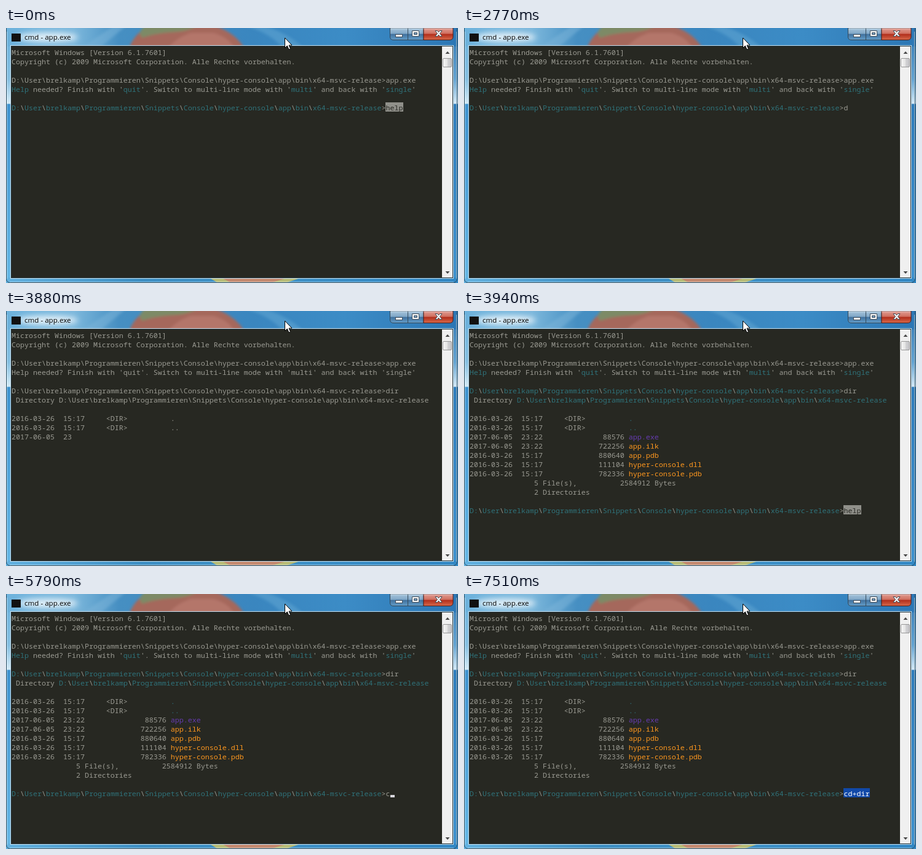
An HTML page for the animation above (8 s loop, 735 px wide and 415 px high).

```html
<!DOCTYPE html>
<html lang="en">
<head>
<meta charset="utf-8">
<title>Console</title>
<style>
  html, body { margin: 0; width: 100%; height: 100%; overflow: hidden; background: #3a88c0; }
  #stage { position: relative; width: 735px; height: 415px; overflow: hidden; }
  #stage > * { position: absolute; }
  #window { left: 0; top: 0; display: block; }
  #title { left: 30px; top: 7px; font: 11.6px/16px "Open Sans", "Noto Sans", sans-serif; color: #000; white-space: pre; }
  pre {
    left: 9px; top: 32px; margin: 0; color: #9a9a92;
    font: 11.667px/15px "Noto Sans Mono", "Liberation Mono", monospace;
    font-variant-ligatures: none;
  }
  pre b, pre i, pre u { font-weight: inherit; font-style: normal; text-decoration: none; }
  pre b { color: #2f727a; }
  pre i { color: #fd971f; }
  pre u { color: #663bb0; }
  pre.plain * { color: inherit; }
  .hint { color: #272822; }
  .pick { color: #fff; }
  #mark { left: 617px; height: 15px; }
  #caret { width: 7px; height: 4px; background: #d8d7dd; }
</style>
</head>
<body>
<div id="stage">
  <svg id="window" width="735" height="415" viewBox="0 0 735 415">
    <defs>
      <linearGradient id="sky" x2="1" y2="0">
        <stop offset="0" stop-color="#6db2dc"/><stop offset=".15" stop-color="#7db8dc"/>
        <stop offset=".25" stop-color="#468fc2"/><stop offset=".55" stop-color="#3a86bf"/>
        <stop offset=".75" stop-color="#3c8cc6"/><stop offset="1" stop-color="#2c76b4"/>
      </linearGradient>
      <linearGradient id="left" x2="0" y2="1">
        <stop offset="0" stop-color="#69b0dc"/><stop offset=".2" stop-color="#86c0e2"/>
        <stop offset=".295" stop-color="#d4eaf6"/><stop offset=".3" stop-color="#3f93d0"/>
        <stop offset="1" stop-color="#66b8e6"/>
      </linearGradient>
      <linearGradient id="right" x2="0" y2="1">
        <stop offset="0" stop-color="#2c72ae"/><stop offset=".2" stop-color="#5f9fce"/>
        <stop offset=".295" stop-color="#d0e6f4"/><stop offset=".3" stop-color="#2a78b8"/>
        <stop offset="1" stop-color="#3a8ecb"/>
      </linearGradient>
      <linearGradient id="floor" x2="1" y2="0">
        <stop offset="0" stop-color="#63b2e0"/><stop offset=".3" stop-color="#3d8fc4"/>
        <stop offset=".6" stop-color="#3f92c8"/><stop offset="1" stop-color="#3187c4"/>
      </linearGradient>
      <linearGradient id="glass" x2="0" y2="1">
        <stop offset="0" stop-color="#a9c6dc"/><stop offset=".48" stop-color="#7fa6c6"/>
        <stop offset=".5" stop-color="#3f6f9c"/><stop offset="1" stop-color="#649dc8"/>
      </linearGradient>
      <linearGradient id="red" x2="0" y2="1">
        <stop offset="0" stop-color="#e2a197"/><stop offset=".48" stop-color="#cf6c5c"/>
        <stop offset=".5" stop-color="#b02c1a"/><stop offset="1" stop-color="#d7694a"/>
      </linearGradient>
      <linearGradient id="grip" x2="1" y2="0">
        <stop offset="0" stop-color="#f6f6f6"/><stop offset=".5" stop-color="#e4e4e4"/>
        <stop offset=".55" stop-color="#d2d2d4"/><stop offset="1" stop-color="#c4c4c8"/>
      </linearGradient>
      <filter id="soft" x="-30%" y="-80%" width="160%" height="260%"><feGaussianBlur stdDeviation="5"/></filter>
      <filter id="blur"><feGaussianBlur stdDeviation="2"/></filter>
      <clipPath id="bar"><path d="M0 0H735V30H0Z"/></clipPath>
      <clipPath id="base"><path d="M0 406H735V415H0Z"/></clipPath>
    </defs>

    <rect width="367" height="415" fill="url(#left)"/>
    <rect x="367" width="368" height="415" fill="url(#right)"/>
    <rect width="735" height="30" fill="url(#sky)"/>
    <g clip-path="url(#bar)">
      <g filter="url(#blur)">
        <path d="M200 34Q206 12 232 -4H340Q376 10 388 34Z" fill="#a5675c"/>
        <path d="M226 -4H312Q296 6 268 7Q240 9 222 16Q212 8 226 -4Z" fill="#7d8a66"/>
        <path d="M262 34Q276 16 300 8H338Q364 16 372 34Z" fill="#b4766a"/>
        <path d="M388 -4Q430 8 452 34H486Q456 6 416 -4Z" fill="#63a8d4" opacity=".5"/>
        <path d="M120 34L176 -4H196L150 34Z" fill="#7fb6da" opacity=".5"/>
      </g>
    </g>
    <rect y="406" width="735" height="9" fill="url(#floor)"/>
    <g clip-path="url(#base)">
      <path d="M328 405H484Q464 412 444 418H350Z" fill="#b9bd78"/>
      <path d="M348 405H462Q440 412 420 418H372Z" fill="#c58a70"/>
    </g>

    <ellipse cx="67" cy="15" rx="50" ry="8" fill="#fff" opacity=".75" filter="url(#soft)"/>
    <rect x=".5" y="-4.5" width="733" height="419" rx="6" fill="none" stroke="#2c4a5c"/>
    <path d="M1.5 6V408M732.5 6V408M6 413.5H728" stroke="#d8eef8" opacity=".6"/>

    <rect x="9" y="9" width="15" height="13" fill="#111"/>

    <path d="M624.5 0V14Q624.5 19.500 630 19.500H679V0Z" fill="url(#glass)" stroke="#34495a"/>
    <path d="M679 0H727V14Q727 19.500 721 19.500H679Z" fill="url(#red)" stroke="#4a1f1c"/>
    <path d="M653.500 0V19" stroke="#34495a"/>
    <path d="M625.500 1H726" stroke="#fff" opacity=".5"/>
    <g fill="#fff" stroke="#414c58" stroke-width="1">
      <rect x="633.500" y="10.500" width="11" height="4"/>
      <path fill-rule="evenodd" d="M660.500 4.500H671.500V13.500H660.500ZM663.500 7.500V10.500H668.500V7.500Z"/>
      <path d="M698 4.500H701.500L703.500 7L705.500 4.500H709L705.500 9L709 13.500H705.500L703.500 11L701.500 13.500H698L701.500 9Z"/>
    </g>

    <rect x="7.500" y="28.500" width="720" height="379" fill="none" stroke="#d6edf8" opacity=".9"/>
    <rect x="8" y="29" width="719" height="378" fill="#1b2b33"/>
    <rect x="9" y="30" width="700" height="376" fill="#272822"/>
    <rect x="709" y="30" width="17" height="376" fill="#f0f0f0"/>
    <rect x="710.500" y="49.500" width="14" height="14" rx="1.500" fill="url(#grip)" stroke="#979797"/>
    <path d="M714.500 42L718 38L721.500 42ZM714.500 396L718 400L721.500 396Z" fill="#484848"/>
  </svg>
  <div id="title">cmd - app.exe</div>
  <div id="mark"></div>
  <div id="caret"></div>
  <pre id="text"></pre>
  <svg style="left:453px;top:15px" width="14" height="22">
    <path d="M.5 1V17.500L4.300 13.900L7 20L9.600 18.900L7 13H12Z" fill="#fff" stroke="#000"/>
  </svg>
</div>
<script>
const $ = id => document.getElementById(id);
const link = s => `<b>${s}</b>`;
const dir = 'D:\\User\\brelkamp\\Programmieren\\Snippets\\Console\\hyper-console\\app\\bin\\x64-msvc-release';
const linkedDir = dir.split('\\').map(link).join('\\');
const prompt = linkedDir + '&gt;';

const file = (date, time, size, name) => `${date}  ${time}${size.padStart(19)} ${name}`;
const folder = name => '2016-03-26  15:17     &lt;DIR&gt;' + ' '.repeat(10) + link(name);

const intro = [
  'Microsoft Windows [Version 6.1.7601]',
  'Copyright (c) 2009 Microsoft Corporation. Alle Rechte vorbehalten.',
  '',
  dir + '&gt;app.exe',
  `${link('Help')} needed? Finish with '${link('quit')}'. Switch to multi-line mode with '${link('multi')}' and back with '${link('single')}'`,
  ''
];
const listing = [
  ...intro,
  prompt + 'dir',
  ' Directory ' + linkedDir,
  '',
  folder('.'),
  folder('..')
];
const partial = [...listing, '2017-06-05  23'];
const full = [
  ...listing,
  file('2017-06-05', '23:22', '88576', '<u>app.exe</u>'),
  file('2017-06-05', '23:22', '722256', '<i>app.ilk</i>'),
  file('2016-03-26', '15:17', '880640', '<i>app.pdb</i>'),
  file('2016-03-26', '15:17', '111104', '<i>hyper-console.dll</i>'),
  file('2016-03-26', '15:17', '782336', '<i>hyper-console.pdb</i>'),
  ' '.repeat(15) + '5 File(s),' + ' '.repeat(10) + '2584912 Bytes',
  ' '.repeat(15) + '2 Directories',
  ''
];

const LOOP = 8000;
const marks = { hint: '#90908a', pick: '#1149a8' };

// start, lines above, input, caret visible, highlight
const steps = [
  [0, intro, 'help', 0, 'hint'],
  [180, intro, 'help', 1, 'hint'],
  [670, intro, 'help', 0, 'hint'],
  [1230, intro, 'help', 1, 'hint'],
  [1720, intro, 'help', 0, 'hint'],
  [2280, intro, 'help', 1, 'hint'],
  [2770, intro, 'd', 0],
  [3010, intro, 'di', 1],
  [3320, intro, 'dir', 1],
  [3820, intro, 'dir', 0],
  [3880, partial, null, 0],
  [3940, full, 'help', 0, 'hint'],
  [4370, full, 'help', 1, 'hint'],
  [4860, full, 'help', 0, 'hint'],
  [5420, full, 'help', 1, 'hint'],
  [5790, full, 'c', 1],
  [5910, full, 'c', 0],
  [6030, full, 'cd', 1],
  [6460, full, 'cd', 1, 'pick'],
  [6950, full, 'cd', 0, 'pick'],
  [7010, full, 'cd+dir', 1, 'pick'],
  [7510, full, 'cd+dir', 0, 'pick']
];

function show([, lines, input, caret, mark]) {
  const typing = input !== null;
  const top = 31 + lines.length * 15;
  const end = 618 + (typing ? input.length * 7 : 0);
  const last = typing ? [`${prompt}<span class="${mark || ''}">${input}</span>`] : [];
  $('text').className = typing ? '' : 'plain';
  $('text').innerHTML = [...lines, ...last].join('\n');
  $('mark').style.cssText = `top:${top}px;width:${mark ? end - 617 : 0}px;background:${marks[mark] || 'none'}`;
  $('caret').style.cssText = `left:${end}px;top:${top + 11}px;opacity:${caret}`;
}

let current;
function tick() {
  const t = performance.now() % LOOP;
  const step = steps.findLast(s => s[0] <= t);
  if (step !== current) show(current = step);
  requestAnimationFrame(tick);
}
tick();
</script>
</body>
</html>
```
